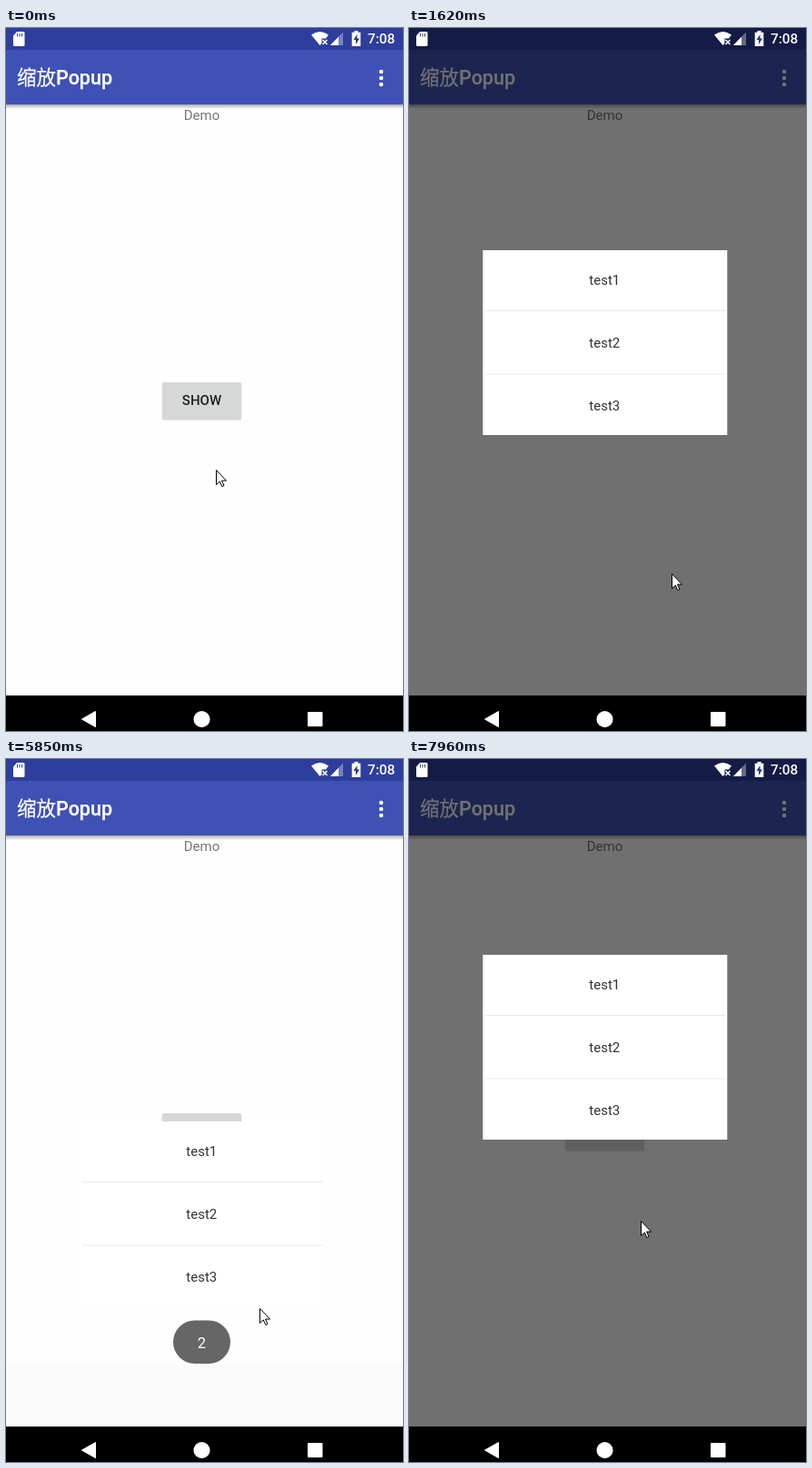
Write an HTML page that moves like this. It is 437 px wide and 772 px high and loops after 7.99 s.

```html
<!DOCTYPE html>
<html lang="zh">
<head>
<meta charset="utf-8">
<style>
  html, body { margin: 0; width: 100%; height: 100%; overflow: hidden; background: #fefefe; }
  svg { display: block; font: 15px Roboto, sans-serif; }
  .medium { font-weight: 500; }
  .cjk { font-weight: 400; font-family: "Noto Sans CJK SC", "Noto Sans CJK", sans-serif; }
  .mid { text-anchor: middle; }
</style>
</head>
<body>
<svg width="437" height="772" viewBox="0 0 437 772">
  <defs>
    <linearGradient id="shade" x2="0" y2="1">
      <stop stop-color="#000" stop-opacity=".32"/>
      <stop offset="1" stop-color="#000" stop-opacity="0"/>
    </linearGradient>
  </defs>
  <rect width="437" height="772" fill="#fefefe"/>
  <rect id="strip" y="665.5" width="437" height="68" fill="#fafafa"/>

  <text class="mid" x="215.5" y="101" fill="#757575">Demo</text>
  <rect x="171.5" y="389" width="88" height="42" rx="3" opacity=".1"/>
  <rect id="button" x="172" y="389" width="87" height="41" rx="2"/>
  <text class="mid medium" x="215.5" y="414" fill="#212121">SHOW</text>

  <rect y="84" width="437" height="5" fill="url(#shade)"/>
  <rect width="437" height="84" fill="#3f51b5"/>
  <rect width="437" height="24" fill="#2e3e9d"/>
  <text class="medium" x="12" y="62" font-size="21.5" fill="#fff" stroke="#fff" stroke-width=".25"><tspan class="cjk">缩放</tspan>Popup</text>
  <path d="M413 48h0m0 7h0m0 7h0" stroke="#fff" stroke-width="4.6" stroke-linecap="round"/>

  <rect id="dim" width="437" height="733"/>

  <g fill="#fff">
    <path d="M12 4h7q1.500 0 1.500 1.500v13q0 1.500-1.500 1.500h-9.500q-1.500 0-1.500-1.500V8.500z"/>
    <path d="M12.500 6v3.500M15 6v3.500M17.500 6v3.500" stroke="#2a3890"/>
    <path d="M336 7.500q9.500-7 19 0l-3 4h-4.500v5.500l-2 2z"/>
    <path d="M348.500 13l5 5m0-5l-5 5" stroke="#fff" stroke-width="1.600"/>
    <path d="M357 19L371 4.500V19z" opacity=".35"/>
    <path d="M357 19l9-9.300V19z"/>
    <path d="M383.500 3h4v1.800h2.800V20h-9.600V4.800h2.800z"/>
    <path d="M386.500 7l-4 6h2.500v5l4-6.500h-2.500z" fill="#26358c"/>
    <text class="medium" x="398" y="17" font-size="15.300">7:08</text>
  </g>

  <rect y="733" width="437" height="39"/>
  <g fill="#fff">
    <path d="M83.500 759l15-8.500v17z" stroke="#fff" stroke-linejoin="round"/>
    <circle cx="215.500" cy="759" r="9"/>
    <rect x="332" y="751" width="16.500" height="16" rx="1"/>
  </g>

  <g id="popup" class="mid" fill="#333">
    <rect x="81.300" width="269" height="203" fill="#fff"/>
    <path d="M84 66.500h264.500M84 136h264.500" stroke="#e9e9e9"/>
    <text x="215.300" y="38">test1</text>
    <text x="215.300" y="107">test2</text>
    <text x="215.300" y="176">test3</text>
  </g>

  <g id="toast">
    <rect x="184" y="616.500" width="63" height="47.500" rx="23.700" fill="#545454" opacity=".89"/>
    <text id="count" class="mid" x="215.300" y="647" font-size="16.500" fill="#fff"></text>
  </g>

  <path id="cursor" d="M.5.500v16l3.800-3.500 2.500 5.500 2.200-1-2.500-5.400h5z" fill="#fff" stroke="#000"/>
</svg>
<script>
const LOOP = 7990, REST = 264, TRAVEL = 202, DIM = .557;
const CLOSE = 5106, GONE = 6000;
const openings = [
  { start: 745, length: 1018, dimFrom: 700, dimTo: 1480 },
  { start: 7289, length: 879, dimFrom: 7267, dimTo: 7820 }
];
// Each pointer move: begin, end, then the place it reaches.
const home = [231, 485];
const moves = [
  [40, 490, 203, 424],
  [1020, 1560, 289, 599],
  [3480, 3540, 291, 604],
  [4010, 4120, 277, 602],
  [4420, 4770, 279, 603],
  [5880, 6000, 303, 609],
  [6220, 6750, 230, 423],
  [7040, 7200, 230, 430],
  [7500, 7960, 255, 507]
];

const el = id => document.getElementById(id);
const ramp = (t, from, to) => Math.min(1, Math.max(0, (t - from) / (to - from)));
const mix = (a, b, p) => a + (b - a) * p;

function overshoot(p, tension) {
  const u = p - 1;
  return u * u * ((tension + 1) * u + tension) + 1;
}

// Top edge of the popup; it springs in and winds up before dropping out.
function popupTop(t, { start, length }) {
  const remaining = t >= CLOSE && t < GONE
    ? overshoot(ramp(t, CLOSE, CLOSE + 1018), -6)
    : 1 - overshoot(ramp(t, start, start + length), 6);
  return Math.round(REST + TRAVEL * remaining);
}

function pointer(t) {
  return moves.reduce(([x, y], [from, to, nextX, nextY]) => {
    const p = ramp(t, from, to);
    return [mix(x, nextX, p), mix(y, nextY, p)];
  }, home).map(Math.round);
}

const place = (id, x, y) => el(id).setAttribute("transform", `translate(${x} ${y})`);
const fade = (id, opacity) => el(id).setAttribute("opacity", opacity);

function draw(t) {
  const opening = openings[t < GONE ? 0 : 1];
  el("popup").style.display = t >= opening.start ? "" : "none";
  place("popup", 0, popupTop(t, opening));

  const dimIn = ramp(t, opening.dimFrom, opening.dimTo) ** .8;
  const dimOut = t < GONE ? ramp(t, CLOSE, 5850) : 0;
  fade("dim", DIM * dimIn * (1 - dimOut));
  fade("strip", t > 5800 && t < 7200 ? 1 : 0);

  fade("toast", t < 4440 ? ramp(t, 2440, 2760) : ramp(t, 4440, 4770) - ramp(t, 7030, 7300));
  el("count").textContent = t < 4440 ? 1 : 2;

  const pressed = ramp(t, opening.dimFrom - 60, opening.dimFrom) - ramp(t, opening.start + 250, opening.dimTo);
  const grey = Math.round(mix(214, 197, pressed));
  el("button").setAttribute("fill", `rgb(${grey},${grey + 1},${grey + 1})`);

  place("cursor", ...pointer(t));
}

const begin = performance.now();
function tick() {
  draw((performance.now() - begin) % LOOP);
  requestAnimationFrame(tick);
}
tick();
</script>
</body>
</html>
```
